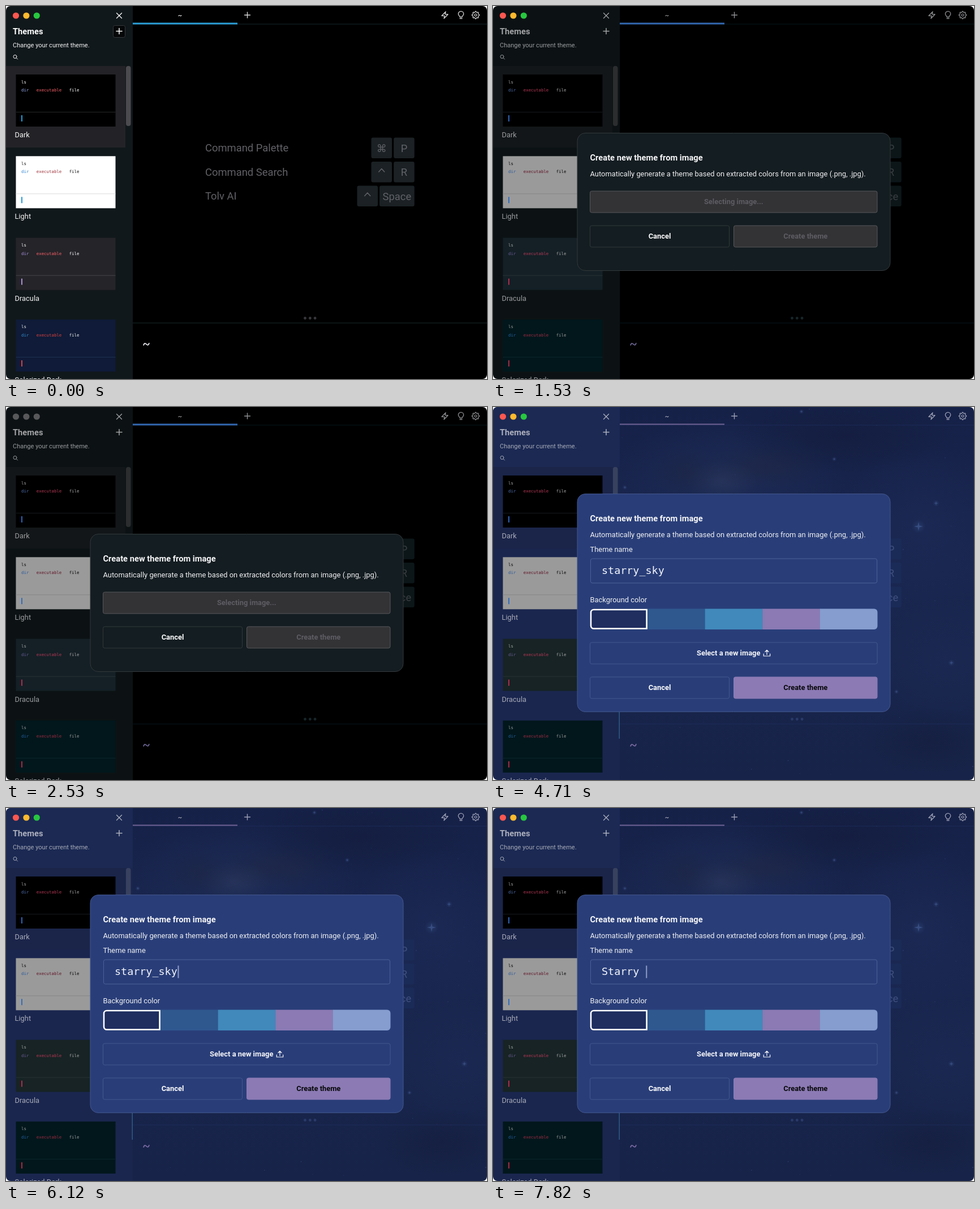
An HTML page with a canvas that plays this animation: 850x659 px, repeating every 8 s.

```html
<!DOCTYPE html>
<html lang="en">
<head>
<meta charset="utf-8">
<title>Theme creator</title>
<style>
html, body { margin: 0; width: 100%; height: 100%; overflow: hidden; background: #fff; }
canvas { display: block; width: 850px; height: 659px; }
</style>
</head>
<body>
<canvas id="stage" width="850" height="659"></canvas>
<script>
const W = 850, H = 659, LOOP = 8000;
const g = document.getElementById('stage').getContext('2d');
const SANS = 'Roboto, sans-serif', MONO = '"DejaVu Sans Mono", monospace';

// Each preview: background, divider, text, dir, executable, cursor
const bright = {
  side: '#11181b', picked: '#232327', bar: '#4b4b4e', main: '#000', line: '#17272b',
  fg: '#f4f4f4', title: '#fff', icon: '#d8d8d8', accent: '#2a9fd8', tab: 3, key: '#1b2124', keyText: '#606268',
  hint: '#616167', dots: '#38383c', prompt: '#f0eef4',
  previews: [
    ['#000', '#26282a', '#fff', '#9aaef0', '#f8636a', '#269bd6'],
    ['#fff', '#dcdcdc', '#111', '#2b84cf', '#9c3038', '#269bd6'],
    ['#252429', '#45444a', '#fff', '#ab94e0', '#f8636a', '#a990d8'],
    ['#0f1b38', '#213255', '#eee', '#348fce', '#d8403f', '#d8403f']
  ]
};
const dim = {
  side: '#0c1214', picked: '#121618', bar: '#2b2d2f', main: '#000', line: '#07191d',
  fg: '#999a9c', title: '#a2a3a5', icon: '#8f9092', accent: '#3268b0', tab: 3, key: '#0c1619', keyText: '#393d40',
  hint: '#3b3b40', dots: '#17262a', prompt: '#6e6694',
  previews: [
    ['#000', '#15191b', '#a4a4a4', '#4f6fb0', '#b33855', '#2f63b4'],
    ['#9a9a9a', '#858585', '#060606', '#2b5a9c', '#5f1527', '#316cbc'],
    ['#142026', '#283237', '#a4a4a4', '#6a5c96', '#b33855', '#b02b4b'],
    ['#01171c', '#0d272d', '#999', '#25609f', '#9d2c40', '#a52b43']
  ]
};
const starry = {
  ...dim,
  side: '#1a264e', picked: '#1b254a', bar: '#38425f', main: null, line: '#1c2b58',
  fg: '#a6a9b6', title: '#adb0bd', icon: '#9a9fb4', accent: '#6f6294', tab: 2, key: '#1a2b58', keyText: '#3f4e7e',
  hint: '#3f4e7e', dots: '#293a6a', prompt: '#7d6ca3',
  previews: dim.previews.map((p, i) => i === 2 ? ['#172324', ...p.slice(1)] : p)
};
const darkModal = { fill: '#141d21', edge: '#33393c', border: '#30383b' };
const blueModal = { fill: '#293e79', edge: '#43568b', border: '#43568c' };

function rect(x, y, w, h, color) {
  g.fillStyle = color;
  g.fillRect(x, y, w, h);
}

function box(x, y, w, h, r, fill, edge) {
  g.beginPath();
  g.roundRect(x, y, w, h, r);
  if (fill) { g.fillStyle = fill; g.fill(); }
  if (edge) { g.strokeStyle = edge; g.lineWidth = 1; g.stroke(); }
}

function text(s, x, y, size, color, weight = 400, align = 'left', family = SANS) {
  g.font = `${weight} ${size}px ${family}`;
  g.textAlign = align;
  g.fillStyle = color;
  g.fillText(s, x, y);
}

function dot(x, y, r, color) {
  g.beginPath();
  g.arc(x, y, r, 0, 7);
  g.fillStyle = color;
  g.fill();
}

// Strokes an SVG path centred on (x, y)
function icon(path, x, y, color, width = 1.3) {
  g.save();
  g.translate(x, y);
  g.strokeStyle = color;
  g.lineWidth = width;
  g.lineCap = g.lineJoin = 'round';
  g.stroke(new Path2D(path));
  g.restore();
}

const PLUS = 'M-5 0H5M0 -5V5';
const CROSS = 'M-4.5 -4.5L4.5 4.5M4.5 -4.5L-4.5 4.5';
const BOLT = 'M1.5 -6L-5.5 1.3H-.5L-1.5 6L5.5 -1.3H.5Z';
const BULB = 'M-2 3.5C-2 1.5 -4.7 .7 -4.7 -2A4.7 4.7 0 0 1 4.7 -2C4.7 .7 2 1.5 2 3.5ZM-2 6H2';
const LENS = 'M2.5 -.5A3 3 0 1 1 -3.5 -.5A3 3 0 1 1 2.5 -.5M1.8 1.8L4 4';
const UPLOAD = 'M0 2.5V-5.5M-3 -2.5L0 -5.5L3 -2.5M-5.7 1V5H5.7V1';
const CARET = 'M-5 3L0 -2.5L5 3';
const TILDE = 'M-4.8 1.6C-3.6 -2.6 -1.6 -1.8 0 0S3.6 2.6 4.8 -1.6';
const GEAR = gearPath();

function gearPath() {
  const pts = [];
  for (let i = 0; i < 32; i++) {
    const a = (i - .5) * Math.PI / 16, r = i % 4 < 2 ? 6.6 : 5;
    pts.push(`${r * Math.cos(a)} ${r * Math.sin(a)}`);
  }
  return `M${pts.join('L')}ZM2 0A2 2 0 1 1 -2 0A2 2 0 1 1 2 0`;
}

const sky = paintSky();

function paintSky() {
  const canvas = document.createElement('canvas');
  canvas.width = W;
  canvas.height = H;
  const c = canvas.getContext('2d');
  const base = c.createLinearGradient(0, 0, 0, H);
  base.addColorStop(0, '#162148');
  base.addColorStop(.45, '#19264f');
  base.addColorStop(1, '#172348');
  c.fillStyle = base;
  c.fillRect(0, 0, W, H);

  const glow = (x, y, rx, ry, rgb, a) => {
    c.save();
    c.translate(x, y);
    c.scale(rx, ry);
    const f = c.createRadialGradient(0, 0, 0, 0, 0, 1);
    f.addColorStop(0, `rgba(${rgb},${a})`);
    f.addColorStop(1, `rgba(${rgb},0)`);
    c.fillStyle = f;
    c.fillRect(-1, -1, 2, 2);
    c.restore();
  };
  glow(410, 130, 210, 110, '32,48,92', .6);
  glow(405, 130, 65, 35, '60,68,98', .3);
  glow(480, 105, 110, 40, '34,38,62', .4);
  glow(340, 115, 60, 45, '30,36,62', .4);
  glow(620, 50, 200, 70, '18,26,56', .5);
  glow(760, 210, 150, 140, '30,46,92', .4);
  glow(800, 450, 130, 110, '30,46,90', .4);
  glow(770, 590, 120, 60, '17,26,54', .4);

  let seed = 17;
  const rnd = () => (seed = seed * 16807 % 2147483647) / 2147483647;
  for (let i = 0; i < 80; i++) {
    c.fillStyle = `rgba(90,120,180,${.08 + rnd() * .2})`;
    c.beginPath();
    c.arc(224 + rnd() * 626, rnd() * H, .4 + rnd() * .7, 0, 7);
    c.fill();
  }
  const star = (x, y, r) => {
    glow(x, y, r * 1.5, r * 1.5, '75,105,165', .25);
    c.fillStyle = '#384e83';
    c.beginPath();
    for (let i = 0; i < 8; i++) {
      const a = i * Math.PI / 4, d = i % 2 ? r * .25 : r;
      c.lineTo(x + d * Math.cos(a), y + d * Math.sin(a));
    }
    c.fill();
  };
  star(752, 211, 8);
  star(783, 170, 4);
  star(545, 8, 3);
  star(233, 142, 3);
  star(603, 92, 3);
  star(810, 452, 4);
  star(713, 503, 3);
  return canvas;
}

function preview(i, [bg, rule, fg, dir, exe, cursor], p) {
  const y = 121 + i * 144.3;
  rect(17.5, y, 176, 92, bg);
  rect(17.5, y + 66, 176, 1, rule);
  const mono = (s, col, dy, color) => text(s, 27 + col * 4.455, y + dy, 7.4, color, 400, 'left', MONO);
  mono('ls', 0, 15.5, fg);
  mono('dir', 0, 30, dir);
  mono('executable', 6, 30, exe);
  mono('file', 19, 30, fg);
  rect(27, y + 72, 2, 11, cursor);
  text(['Dark', 'Light', 'Dracula', 'Solarized Dark'][i], 15.5, y + 111, 12.9, p.fg);
}

function sidebar(p, focused, hover) {
  rect(0, 0, 224, H, p.side);
  if (!p.main) {
    rect(0, 0, 224, 106, '#1b2953');
    rect(222.5, 538, 1.5, 48, '#2c5d86');
  }
  rect(0, 106, 211, 144, p.picked);
  box(212, 106, 8.5, 106, 4, p.bar);
  ['#fe5750', '#feb92e', '#27c83f'].forEach((c, i) => dot(17.5 + i * 18.4, 17, 5.6, focused ? c : '#58585a'));
  icon(CROSS, 200, 17, p.title);
  if (hover) box(189.5, 34.5, 21, 21, 3, '#050708', '#34383a');
  icon(PLUS, 200, 44.5, p.title, 1.5);
  text('Themes', 12, 50, 14.7, p.title, 700);
  text('Change your current theme.', 12, 72.5, 11.04, p.fg);
  icon(LENS, 16.5, 90, p.fg, 1);
  p.previews.forEach((colors, i) => preview(i, colors, p));
}

function keycap(x, y, w, label, p) {
  box(x, y, w, 36.5, 3, p.key);
  const cx = x + w / 2;
  if (label === '^') icon(CARET, cx, y + 15, p.keyText, 1.5);
  else if (label === '⌘') text(label, cx, y + 25, 18, p.keyText, 400, 'center', '"DejaVu Sans", sans-serif');
  else text(label, cx, y + 25, 18.4, p.keyText, 400, 'center');
}

function terminal(p) {
  if (p.main) rect(224, 0, 626, H, p.main);
  else g.drawImage(sky, 224, 0, 626, H, 224, 0, 626, H);
  rect(224, 31.5, 626, 1, p.line);
  rect(224, 29.5, 185, p.tab, p.accent);
  text('~', 307.5, 20, 11, p.fg, 500, 'center');
  icon(PLUS, 426.5, 16, p.icon, 1.4);
  icon(BOLT, 775.5, 16, p.icon);
  icon(BULB, 804, 16, p.icon);
  icon(GEAR, 830, 16, p.icon, 1.2);

  ['Command Palette', 'Command Search', 'Tolv AI'].forEach((s, i) => text(s, 352, 257.3 + i * 42.4, 18.4, p.hint));
  keycap(645.5, 232.5, 36.5, '⌘', p);
  keycap(685.2, 232.5, 36.5, 'P', p);
  keycap(645.5, 275, 36.5, '^', p);
  keycap(685.2, 275, 36.5, 'R', p);
  keycap(620.5, 317.5, 36.5, '^', p);
  keycap(660, 317.5, 61.7, 'Space', p);

  for (let i = 0; i < 3; i++) dot(528.5 + i * 8.8, 551.5, 2.4, p.dots);
  rect(224, 559.5, 626, 1, p.line);
  icon(TILDE, 248, 597.5, p.prompt, 1.8);
}

function button(x, y, w, label, fill, edge, color, upload) {
  box(x + .5, y + .5, w - 1, 38, 3, fill, edge);
  const cx = x + w / 2 - (upload ? 9 : 0);
  text(label, cx, y + 23.7, 12.9, color, 700, 'center');
  if (upload) icon(UPLOAD, cx + g.measureText(label).width / 2 + 11.5, y + 19.5, color, 1.2);
}

function modal(y, h, style) {
  box(149, y + .5, 553, h, 14, style.fill, style.edge);
  text('Create new theme from image', 171.5, y + 49, 14.7, '#f6f6f8', 700);
  text('Automatically generate a theme based on extracted colors from an image (.png, .jpg).',
    171.5, y + 77, 12.9, '#f0f0f3');
}

// Bottom row: Cancel beside Create theme
function actions(y, style, fill, edge, color) {
  button(171, y, 247, 'Cancel', null, style.border, '#fff');
  button(425, y, 254.5, 'Create theme', fill, edge, color);
}

function imageModal(selecting) {
  modal(224, 243, darkModal);
  if (selecting) button(171, 326.5, 508.5, 'Selecting image...', '#333336', '#56565a', '#5d5d63');
  else button(171, 326.5, 508.5, 'Select an image', '#23a1dd', '#23a1dd', '#05090c', true);
  actions(387.5, darkModal, '#333336', '#56565a', '#5d5d63');
}

// When each typed letter of the new name lands
const KEYS = [6880, 7060, 7180, 7300, 7470, 7710, 7820];

function nameField(t) {
  const typed = KEYS.filter(k => t >= k).length;
  const name = typed ? 'Starry '.slice(0, typed) : 'starry_sky';
  const selected = t >= 6240 && !typed;
  const caret = typed || (t >= 6120 && t < 6300);
  box(172.5, 268, 506, 43, 3, null, '#4c6197');
  if (selected) rect(192, 278, 111, 23, '#4d68aa');
  text(name, 192, 295, 18.4, '#f4f5f9', 400, 'left', MONO);
  if (caret) rect(192 + name.length * 11.08 + .7, 278.5, 2, 22, '#8f9cc6');
}

function detailsModal(t) {
  modal(153, 385, blueModal);
  text('Theme name', 171.5, 256.3, 12.9, '#f0f0f3');
  nameField(t);
  text('Background color', 171.5, 345, 12.9, '#f0f0f3');
  g.save();
  g.beginPath();
  g.roundRect(171.5, 356.5, 508, 36.5, 6);
  g.clip();
  ['#1f2d5f', '#2f588f', '#4189bb', '#8b7ab4', '#859dcf'].forEach((c, i) => rect(171.5 + i * 101.6, 356, 102, 38, c));
  g.restore();
  g.beginPath();
  g.roundRect(173, 358, 98.6, 33.5, [5, 0, 0, 5]);
  g.strokeStyle = '#fff';
  g.lineWidth = 2.6;
  g.stroke();
  button(171, 415.5, 508.5, 'Select a new image', null, blueModal.border, '#f6f6f8', true);
  actions(476.5, blueModal, '#8b7ab4', '#8b7ab4', '#08080b');
}

function draw(t) {
  const p = t < 180 ? bright : t < 4710 ? dim : starry;
  rect(0, 0, W, H, '#fff');
  g.save();
  g.beginPath();
  g.roundRect(0, 0, W, H, 8);
  g.clip();
  terminal(p);
  sidebar(p, t < 2530 || t >= 4240, t < 180);
  if (t >= 4710) detailsModal(t);
  else if (t >= 180) imageModal(t >= 1530);
  g.restore();
}

const start = performance.now();
function tick() {
  draw((performance.now() - start) % LOOP);
  requestAnimationFrame(tick);
}
tick();
</script>
</body>
</html>
```
